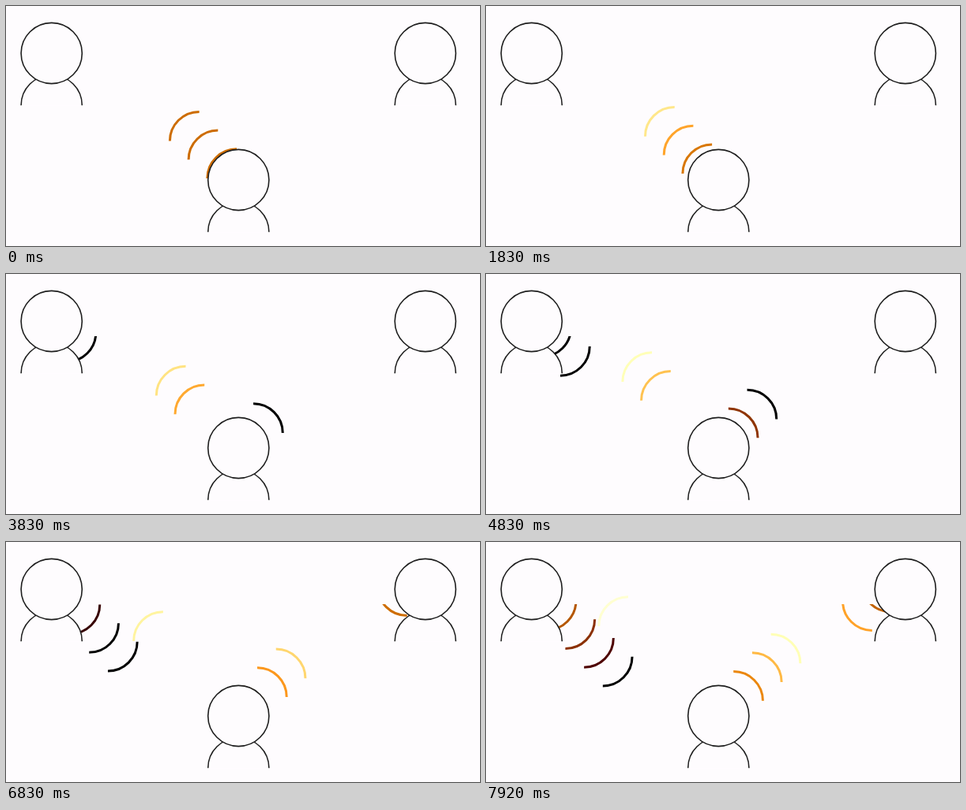
Recreate the animation shown at these times as an HTML page with a canvas. Size 600 by 305 pixels, loop 8 s.

```html
<!DOCTYPE html>
<html lang="en">
<head>
<meta charset="utf-8">
<title>Three talkers</title>
<style>
  html, body { margin: 0; width: 100%; height: 100%; overflow: hidden; background: #fefcfe; }
  canvas { display: block; width: 600px; height: 305px; }
</style>
</head>
<body>
<canvas id="stage" width="600" height="305"></canvas>
<script>
const ctx = document.getElementById('stage').getContext('2d');
const FPS = 12, FRAMES = 96;
const BG = '#fefcfe', INK = '#1e1e1e';
const GAP = 23.7, WAVE_R = 37.2, HEAD_R = 38.6, CLIP_Y = 79;

const PEOPLE = [[57.7, 60], [530.8, 60], [294.3, 221]];

// first: beat of the first wave; turn: second when its waves switch from cooling to heating.
const SOURCES = [
  { x: 294, y: 221, dx: -1, dy: -1, first: -2, count: 4, turn: 0 },
  { x: 294, y: 221, dx: 1, dy: -1, first: 2, turn: 5.72 },
  { x: 57.5, y: 55.4, dx: 1, dy: 1, first: 2, turn: 8.27, clip: true },
  { x: 508, y: 56, dx: -1, dy: 1, first: 5, turn: 5, clip: true }
];

const clamp = (v, lo = 0, hi = 1) => Math.max(lo, Math.min(hi, v));

// Steady speed with a short lag after the first second.
const travelAt = t => 2 + 17.45 * t - 2.4 * clamp((t - 0.92) / 0.9);

// Later waves change more slowly; heat drifts away from 0.5 with distance.
function heatOf(src, n, d, t) {
  const gain = Math.min(1, 2.2 * (t - src.turn));
  return 0.5 + 0.0075 * 0.8 ** n * d * gain;
}

// Black through brown, orange and yellow to white.
function heatColor(heat) {
  const h = clamp(heat);
  const rgb = [410 * h, 372 * (h - 0.21), 255 * clamp(2 * h - 1) ** 1.5];
  return `rgb(${rgb.map(c => Math.round(clamp(c, 0, 255)))})`;
}

function drawWaves(src, t) {
  const { x, y, dx, dy, first, count = Infinity, clip } = src;
  const mid = Math.atan2(dy, dx);
  const nearest = clip ? -12 : 0;
  ctx.save();
  if (clip) {
    ctx.beginPath();
    ctx.rect(0, CLIP_Y, 600, 305);
    ctx.clip();
  }
  ctx.lineWidth = 3;
  for (let n = 0; n < count; n++) {
    const d = travelAt(t) - (first + n) * GAP;
    if (d < nearest) break;
    const heat = heatOf(src, n, d, t);
    if (heat >= 1) continue;
    ctx.strokeStyle = heatColor(heat);
    ctx.beginPath();
    ctx.arc(x + dx * d, y + dy * d, WAVE_R, mid - Math.PI / 4, mid + Math.PI / 4);
    ctx.stroke();
  }
  ctx.restore();
}

function drawPerson([x, y]) {
  ctx.fillStyle = BG;
  ctx.strokeStyle = INK;
  ctx.lineWidth = 1.6;
  const bow = (cy, from) => {
    ctx.beginPath();
    ctx.arc(x, cy, HEAD_R, from, 2 * Math.PI);
    ctx.fill();
    ctx.stroke();
  };
  bow(y + 66.3, Math.PI);
  bow(y, 0);
}

function draw(t) {
  ctx.fillStyle = BG;
  ctx.fillRect(0, 0, 600, 305);
  SOURCES.forEach(src => drawWaves(src, t));
  PEOPLE.forEach(drawPerson);
}

const start = performance.now();
function tick() {
  const elapsed = performance.now() - start;
  // A small lead absorbs rounding of the frame times.
  const frame = Math.floor((elapsed + 4) * FPS / 1000) % FRAMES;
  draw(frame / FPS);
  requestAnimationFrame(tick);
}
tick();
</script>
</body>
</html>
```
